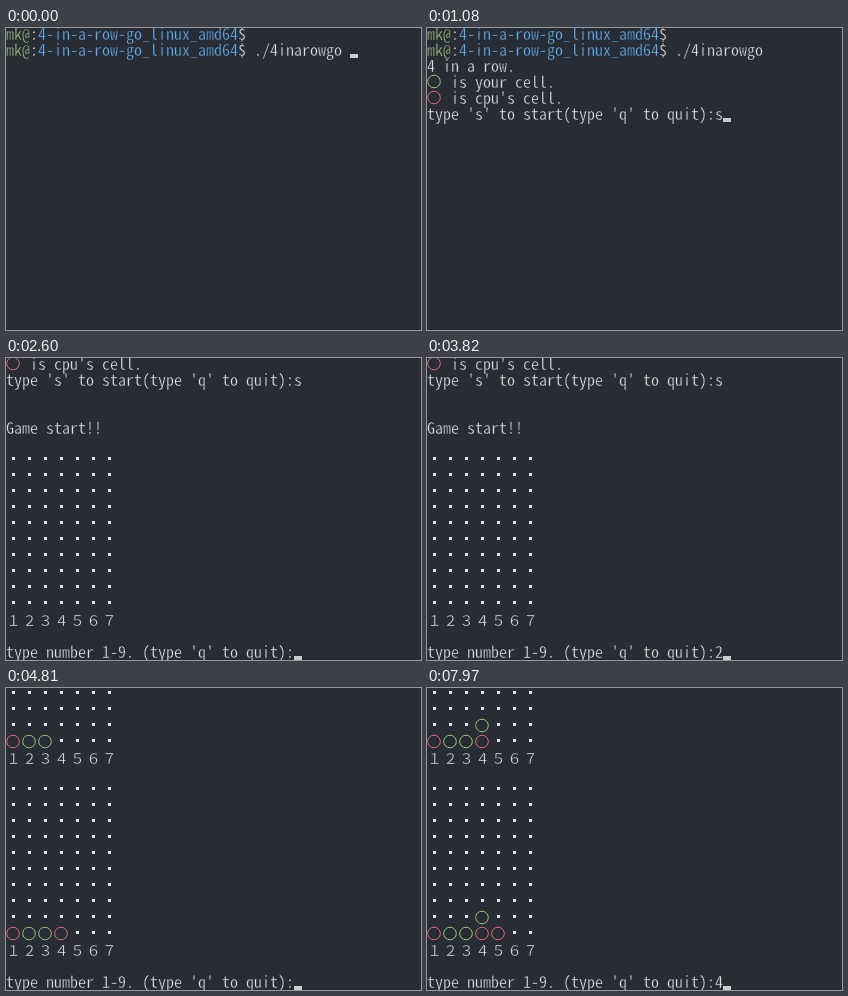
An HTML page with a canvas that plays this animation: 415 px wide and 302 px high, repeating every 8000 ms.

```html
<!DOCTYPE html>
<html lang="en">
<head>
<meta charset="utf-8">
<title>4 in a row</title>
<style>
  html, body { margin: 0; width: 100%; height: 100%; overflow: hidden; background: #282c34; }
  canvas { display: block; }
</style>
</head>
<body>
<canvas id="stage" width="415" height="302"></canvas>
<script>
const ctx = document.getElementById('stage').getContext('2d');
const LOOP = 8000, CELL = 8, LINE = 16, BASELINE = 12;
const BG = '#282c34', FG = '#dcdfe4', GREEN = '#98c379', RED = '#e06c75', BLUE = '#61afef';
const CURSOR = '#cccccc';
const FAMILY = '"Noto Sans Mono CJK JP", "Noto Sans CJK JP", "Noto Sans Mono", monospace';
const START = "type 's' to start(type 'q' to quit):";
const ASK = "type number 1-9. (type 'q' to quit):";

// A hairline in the background colour trims the glyph to a lighter weight.
function glyph(ch, x, y, color, size = 16) {
  ctx.font = `300 ${size}px ${FAMILY}`;
  ctx.fillStyle = color;
  ctx.fillText(ch, x, y);
  ctx.strokeStyle = BG;
  ctx.lineWidth = 0.3;
  ctx.strokeText(ch, x, y);
}

// Each character sits in its own terminal cell.
function print(row, col, text, color = FG) {
  [...text].forEach((ch, i) => glyph(ch, (col + i + 0.5) * CELL, row * LINE + BASELINE, color));
}

function disc(row, slot, color) {
  ctx.strokeStyle = color;
  ctx.lineWidth = 1;
  ctx.beginPath();
  ctx.arc(slot * 16 + 7, row * LINE + 5.5, 6.3, 0, Math.PI * 2);
  ctx.stroke();
}

function cursor(row, col) {
  ctx.fillStyle = CURSOR;
  ctx.fillRect(col * CELL, row * LINE + 10, CELL, 4);
}

function shell(row, command = '') {
  print(row, 0, 'mk@', GREEN);
  print(row, 3, ':');
  print(row, 4, '4-in-a-row-go_linux_amd64', BLUE);
  print(row, 29, '$ ' + command);
}

function legend(row, color, owner) {
  disc(row, 0, color);
  print(row, 3, `is ${owner} cell.`);
}

// Moves alternate green, red; each disc lands on top of its column.
function board(firstRow, rows, moves) {
  const bottom = firstRow + rows - 1, height = Array(7).fill(0), taken = new Set();
  [...moves].forEach((move, i) => {
    const slot = move - 1, row = bottom - height[slot]++;
    disc(row, slot, i % 2 ? RED : GREEN);
    taken.add(row * 7 + slot);
  });
  ctx.fillStyle = FG;
  for (let row = firstRow; row <= bottom; row++)
    for (let slot = 0; slot < 7; slot++)
      if (!taken.has(row * 7 + slot)) ctx.fillRect(slot * 16 + 6, row * LINE + 3, 3, 3);
  [...'１２３４５６７'].forEach((digit, slot) =>
    glyph(digit, slot * 16 + 7.5, (bottom + 1) * LINE + BASELINE, FG, 14.5));
}

function launch(running) {
  shell(0);
  shell(1, './4inarowgo');
  if (!running) return;
  print(2, 0, '4 in a row.');
  legend(3, GREEN, 'your');
  legend(4, RED, "cpu's");
  print(5, 0, START);
}

function opening() {
  legend(0, RED, "cpu's");
  print(1, 0, START + 's');
  print(4, 0, 'Game start!!');
  board(6, 10, '');
  print(18, 0, ASK);
}

function round(moves) {
  board(0, 4, moves.slice(0, -1));
  board(6, 10, moves);
  print(18, 0, ASK);
}

// start time, screen, input row, input column, typed key
const scenes = [
  [0, () => launch(false), 1, 43, ''],
  [100, () => launch(true), 5, 36, ''],
  [1080, () => launch(true), 5, 36, 's'],
  [1510, opening, 18, 36, ''],
  [3820, opening, 18, 36, '2'],
  [4040, () => round('21'), 18, 36, ''],
  [4590, () => round('21'), 18, 36, '3'],
  [4810, () => round('2134'), 18, 36, ''],
  [5900, () => round('2134'), 18, 36, '4'],
  [6230, () => round('213445'), 18, 36, ''],
  [7970, () => round('213445'), 18, 36, '4']
];
const cursorOff = [[530, 630], [2060, 2600], [3160, 3510], [5570, 5900], [7210, 7750]];

function draw(t) {
  ctx.fillStyle = BG;
  ctx.fillRect(0, 0, 415, 302);
  ctx.textAlign = 'center';
  ctx.textBaseline = 'alphabetic';
  const [, screen, row, col, key] = scenes.findLast(scene => scene[0] <= t);
  screen();
  print(row, col, key);
  if (!cursorOff.some(([from, to]) => t >= from && t < to)) cursor(row, col + key.length);
}

let origin;
function tick(now) {
  origin ??= now;
  draw((now - origin) % LOOP);
  requestAnimationFrame(tick);
}
draw(0);
requestAnimationFrame(tick);
</script>
</body>
</html>
```
